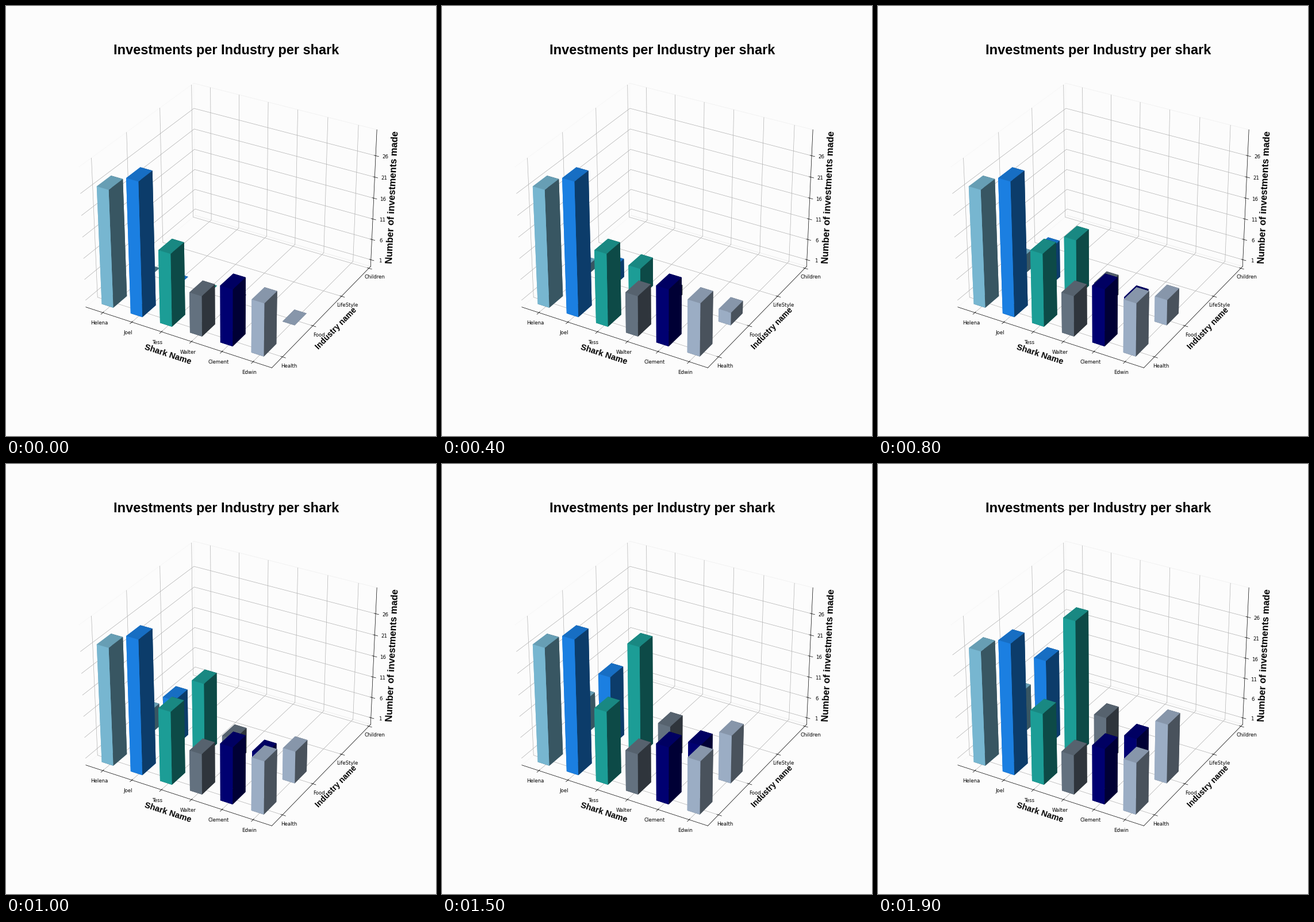
Recreate the animation shown at these times as a matplotlib script. Size 748 by 748 pixels, loop 2 s.

```python
import numpy as np
import matplotlib.pyplot as plt
from matplotlib.animation import FuncAnimation

SIZE = 748
STEPS = 20
BAR = 0.4
BG = "#fcfcfc"

names = ["Helena", "Joel", "Tess", "Walter", "Clement", "Edwin"]
industries = ["Health", "Food", "LifeStyle", "Children"]
colors = ["skyblue", "dodgerblue", "lightseagreen",
          "slategray", "navy", "lightsteelblue"]
health = 0.95 * np.array([29, 33, 18, 10, 14, 13])
food = np.array([11, 22, 34, 12, 9, 15])


def padded(lo, hi):
    """Widen a range by the small gap between data and panes."""
    gap = (hi - lo) / 48
    return lo - gap, hi + gap


def label(x, y, text, px, **kw):
    """Place text at pixel coordinates measured from the top left."""
    fig.text(x / SIZE, 1 - y / SIZE, text, family="Liberation Sans",
             weight="bold", size=px * 72 / fig.dpi, ha="center", **kw)


def axis_label(x, y, text, px, angle):
    label(x, y, text, px, va="center", rotation=angle, rotation_mode="anchor")


fig = plt.figure(figsize=(12, 12), dpi=SIZE / 12, facecolor=BG)
ax = fig.add_subplot(projection="3d", computed_zorder=False)
ax.set_facecolor(BG)
ax.view_init(elev=30, azim=-60)
for axis in (ax.xaxis, ax.yaxis, ax.zaxis):
    axis.pane.fill = False

ax.set_xticks(np.arange(6) + BAR / 2, names)
ax.set_yticks(np.arange(4) + BAR / 2, industries)
ax.set_zticks(np.arange(1, 31, 5))
ax.set_xlim(*padded(-0.27, 5.67))
ax.set_ylim(*padded(-0.07, 3.2))

label(383.4, 84.4, "Investments per Industry per shark", 23.57, va="baseline")
axis_label(282, 606, "Shark Name", 14.6, -18.1)
axis_label(574, 561, "Industry name", 14.0, 45.7)
axis_label(673, 332, "Number of investments made", 16.5, 87.4)

bars = []


def update(i):
    while bars:
        bars.pop().remove()
    grown = food * i / STEPS
    ax.set_zlim(*padded(0, max(health.max(), grown.max())))
    # far row first, then left to right, so nearer bars cover the others
    for y, heights in ((1, grown), (0, health)):
        for x, (h, c) in enumerate(zip(heights, colors)):
            bars.append(ax.bar3d([x], [y], [0], BAR, BAR, [h], color=c))
    return bars


anim = FuncAnimation(fig, update, frames=STEPS, interval=100,
                     repeat=True, repeat_delay=0, blit=False)
plt.show()
```
